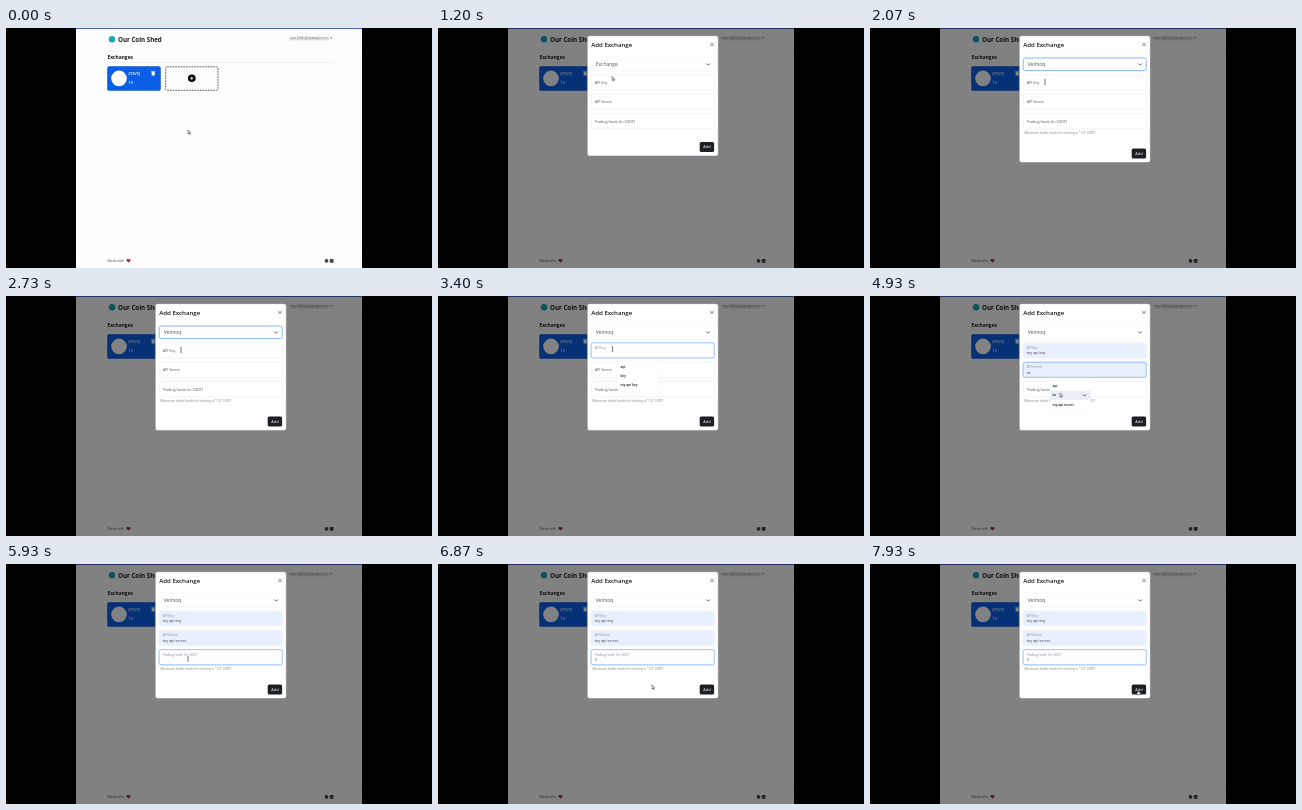
These frames come from a looping animation (426 px wide and 240 px high, 8000 ms). An HTML page with a canvas:

```html
<!DOCTYPE html>
<html lang="en">
<head>
<meta charset="utf-8">
<title>Add Exchange</title>
<style>
  html, body { margin: 0; width: 100%; height: 100%; overflow: hidden; background: #000; }
  canvas { display: block; width: 100%; height: 100%; }
</style>
</head>
<body>
<canvas id="stage"></canvas>
<script>
const W = 426, H = 240, LOOP = 8000, STEP = 1000 / 15;
const FONT = '"Open Sans", "Noto Sans", sans-serif';
const INK = '#17191d', GREY = '#53565e', FOCUS = '#86b7fe', FILLED = '#e8f0fe';
const EXCHANGE = 'Velmoq';
const canvas = document.getElementById('stage');
const ctx = canvas.getContext('2d');

// Moments of the recorded session, in ms
const T = {
  open: 800, list: 1470, pick: 1930, blurSelect: 2670,
  key: 2930, keyDone: 3970, secret: 4400, secretDone: 5270,
  funds: 5800, typed: 6330
};

// Pointer stops: time, x, y
const STOPS = [
  [0, 182, 102], [270, 182, 102], [650, 186, 50], [850, 186, 50],
  [1170, 174, 49], [1400, 176, 37], [1570, 176, 37], [1850, 175, 54],
  [2800, 175, 54], [3100, 174.5, 53], [3470, 174.5, 53], [3830, 190, 89],
  [4030, 190, 89], [4330, 176, 74], [4530, 176, 74], [4850, 190, 97],
  [4970, 190, 97], [5130, 191, 107], [5330, 191, 107], [5670, 182, 95],
  [6130, 182, 95], [6600, 214, 121], [7270, 214, 121], [7730, 268, 126],
  [8000, 268, 126]
];

const clamp = v => Math.max(0, Math.min(1, v));
const ease = v => v * v * (3 - 2 * v);
const between = (t, a, b) => t >= a && t < b;

function pointerAt(t) {
  const i = Math.max(1, STOPS.findIndex(s => s[0] > t));
  const [t0, x0, y0] = STOPS[i - 1], [t1, x1, y1] = STOPS[i];
  const p = ease(clamp((t - t0) / (t1 - t0)));
  return [x0 + (x1 - x0) * p, y0 + (y1 - y0) * p];
}

function text(str, x, y, size, color = INK, weight = 400, align = 'left') {
  ctx.font = `${weight} ${size}px ${FONT}`;
  ctx.fillStyle = color;
  ctx.textAlign = align;
  ctx.textBaseline = 'alphabetic';
  ctx.fillText(str, x, y + size * 0.36);
}

function rect(x, y, w, h, fill) {
  ctx.fillStyle = fill;
  ctx.fillRect(x, y, w, h);
}

function box(x, y, w, h, r, fill, stroke, width = 0.5) {
  ctx.beginPath();
  ctx.roundRect(x, y, w, h, r);
  if (fill) { ctx.fillStyle = fill; ctx.fill(); }
  if (stroke) { ctx.strokeStyle = stroke; ctx.lineWidth = width; ctx.stroke(); }
}

function disc(x, y, r, fill) {
  ctx.beginPath();
  ctx.arc(x, y, r, 0, Math.PI * 2);
  ctx.fillStyle = fill;
  ctx.fill();
}

function line(points, color, width) {
  ctx.beginPath();
  points.forEach(([x, y]) => ctx.lineTo(x, y));
  ctx.strokeStyle = color;
  ctx.lineWidth = width;
  ctx.stroke();
}

const chevron = (x, y) => line([[x - 1.5, y - 0.7], [x, y + 0.8], [x + 1.5, y - 0.7]], INK, 0.7);

function drawPage() {
  rect(70, 0, 286, H, '#fdfdfe');
  rect(70, 0, 286, 0.9, '#3d52b5');
  rect(70, 22.5, 286, 0.5, '#f0f1f3');
  rect(101.5, 34, 226, 0.5, '#e4e6e9');
  rect(70, 225, 286, 0.5, '#f0f1f3');

  disc(106, 11.3, 3.2, '#1aa3b0');
  text('Our Coin Shed', 112, 11.3, 6.2, INK, 700);
  text('sam.fields@example.com', 322.5, 10, 3.3, GREY, 400, 'right');
  rect(284, 11.7, 38.5, 0.4, '#8b8e95');
  text('▾', 324.3, 9.8, 3.5, GREY);
  text('Exchanges', 101.5, 29, 4.9, INK, 700);

  box(101.5, 38.5, 53, 24, 1.5, '#0b5fe6', '#0a4fc2');
  disc(113, 50.4, 7.8, '#fff');
  text('ZOVQ', 122.3, 45.2, 4.3, '#fff', 600);
  text('10', 122.6, 54.8, 3.6, '#fff', 600);
  box(145.6, 44, 3.2, 3.6, 0.6, '#fff');
  rect(145.1, 42.9, 4.2, 0.7, '#fff');

  ctx.setLineDash([1.7, 1]);
  box(159.7, 38.8, 52.3, 23.5, 1.5, null, '#33353a', 0.8);
  ctx.setLineDash([]);
  disc(185.8, 50.3, 3.8, '#000');
  line([[184, 50.3], [187.6, 50.3]], '#fff', 0.8);
  line([[185.8, 48.5], [185.8, 52.1]], '#fff', 0.8);

  text('Made with', 101.5, 232.7, 3.4, GREY);
  disc(121.6, 232.2, 1.1, '#a3222c');
  disc(123.4, 232.2, 1.1, '#a3222c');
  ctx.beginPath();
  [[120.6, 232.6], [124.4, 232.6], [122.5, 234.6]].forEach(p => ctx.lineTo(...p));
  ctx.fill();
  disc(320.5, 232.8, 1.9, '#42454b');
  box(323.8, 231, 3.7, 3.7, 0.5, '#42454b');
}

function drawField(y, label, { value = '', focus = false, filled = false }) {
  const border = focus ? FOCUS : '#eff0f3';
  if (focus) box(153.2, y, 123, 15, 1.8, null, '#d3e4ff', 1.5);
  box(153.2, y, 123, 15, 1.8, filled ? FILLED : '#fff', border, 0.7);
  if (focus || value) {
    text(label, 156.7, y + 4.7, 3.2, '#85898f');
    text(value, 156.7, y + 10.2, 3.8, '#3c4048');
  } else {
    text(label, 156.7, y + 7.5, 3.7, GREY);
  }
}

function drawSuggestions(y, items, hover) {
  box(180, y, 41, 31, 1, '#fff', '#f1f2f4', 0.4);
  items.forEach((item, i) => {
    const middle = y + 5.5 + i * 9.3;
    if (i === hover) {
      rect(180.3, middle - 4.4, 40.4, 8.8, '#e9edf5');
      chevron(214.5, middle);
    }
    text(item, 182.5, middle, 3.3, INK, 600);
  });
}

function hoveredRow(y, [px, py]) {
  return px > 180 && py >= y + 1 && py < y + 29 ? Math.floor((py - y - 1) / 9.3) : -1;
}

function drawModal(t, pointer) {
  const picked = t >= T.pick;
  const bottom = picked ? 134.5 : 128;
  box(149.3, 7.7, 131, bottom - 7.7, 2.3, '#fff', '#6f7074', 0.4);
  text('Add Exchange', 153.2, 16.8, 6.1, INK, 600);
  line([[272.3, 14.8], [275.7, 18.2]], GREY, 0.7);
  line([[275.7, 14.8], [272.3, 18.2]], GREY, 0.7);

  const selectFocus = between(t, T.list, T.blurSelect);
  box(153.2, 30, 123, 12.6, 1.8, '#fff', selectFocus ? FOCUS : '#f3f4f6', selectFocus ? 1 : 0.5);
  text(picked ? EXCHANGE : 'Exchange', 157.7, 36.4, 5, GREY);
  chevron(270.3, 36.3);

  const keys = ['api', 'key', 'my api key'];
  const secrets = ['api', 'as', 'my api secret'];
  const keyOpen = between(t, T.key, T.keyDone);
  const secretOpen = between(t, T.secret, T.secretDone);
  const keyHover = hoveredRow(65, pointer);
  const secretHover = hoveredRow(84.5, pointer);
  // Hovering a suggestion previews it in the field
  const key = t >= T.keyDone ? keys[2] : keyOpen && keys[keyHover] || '';
  const secret = t >= T.secretDone ? secrets[2] : secretOpen && secrets[secretHover] || '';

  drawField(46.9, 'API Key', { value: key, focus: between(t, T.key, T.secret), filled: !!key });
  drawField(66.3, 'API Secret', { value: secret, focus: between(t, T.secret, T.funds), filled: !!secret });
  drawField(85.7, 'Trading funds (in USDT)', { value: t >= T.typed ? '2' : '', focus: t >= T.funds });
  if (picked) {
    text(`Minimum trade funds for ${EXCHANGE.toLowerCase()} is "1.0" USDT`, 154.5, 105, 3.25, '#7b7f87');
  }

  box(261.7, bottom - 14, 14.4, 10, 1.6, '#1c1f24');
  text('Add', 268.9, bottom - 9, 3.9, '#fff', 400, 'center');

  if (between(t, T.list, T.pick)) {
    box(153.2, 43, 123, 22, 0.5, '#fff', '#8d9096', 0.5);
    const row = pointer[1] > 50 ? 1 : 0;
    rect(153.5, 43.6 + row * 7, 122.4, 7, '#1967d2');
    ['Exchange', EXCHANGE, 'ZOVQ'].forEach((name, i) =>
      text(name, 157.7, 47 + i * 7, 4.4, i === row ? '#fff' : INK));
  }
  if (keyOpen) drawSuggestions(65, keys, keyHover);
  if (secretOpen) drawSuggestions(84.5, secrets, secretHover);
}

function drawPointer(t, [x, y]) {
  const overField = between(t, T.pick, 3600) || between(t, 4200, 4600) || between(t, 5600, 6250);
  const overButton = between(t, 570, T.open) || t >= 7660;
  if (overField) {
    line([[x - 0.9, y - 2.2], [x + 0.9, y - 2.2]], '#333', 0.5);
    line([[x, y - 2.2], [x, y + 2.2]], '#333', 0.6);
    line([[x - 0.9, y + 2.2], [x + 0.9, y + 2.2]], '#333', 0.5);
  } else if (overButton) {
    box(x - 0.5, y, 1.1, 3.4, 0.5, '#fff', '#222', 0.5);
    box(x - 0.9, y + 2, 3.2, 2.8, 0.8, '#fff', '#222', 0.5);
  } else {
    ctx.beginPath();
    [[0, 0], [0, 4], [0.9, 3.2], [1.5, 4.6], [2.1, 4.3], [1.5, 3], [2.8, 2.9]]
      .forEach(([dx, dy]) => ctx.lineTo(x + dx, y + dy));
    ctx.closePath();
    ctx.fillStyle = '#fff';
    ctx.fill();
    ctx.strokeStyle = '#222';
    ctx.lineWidth = 0.5;
    ctx.stroke();
  }
}

function resize() {
  const ratio = window.devicePixelRatio || 1;
  canvas.width = Math.round(innerWidth * ratio);
  canvas.height = Math.round(innerHeight * ratio);
}

function render(now) {
  const t = Math.floor((now % LOOP) / STEP) * STEP;
  const pointer = pointerAt(t);
  ctx.setTransform(canvas.width / W, 0, 0, canvas.height / H, 0, 0);
  rect(0, 0, W, H, '#000');
  drawPage();

  const shown = clamp((t - T.open) / 250);
  if (shown > 0) {
    rect(70, 0, 286, H, `rgba(0, 0, 0, ${0.49 * shown})`);
    ctx.save();
    ctx.globalAlpha = shown;
    ctx.translate(0, -10 * (1 - ease(shown)));
    drawModal(t, pointer);
    ctx.restore();
  }
  drawPointer(t, pointer);
}

const start = performance.now();
function frame() {
  render(performance.now() - start);
  requestAnimationFrame(frame);
}
addEventListener('resize', resize);
resize();
frame();
</script>
</body>
</html>
```
